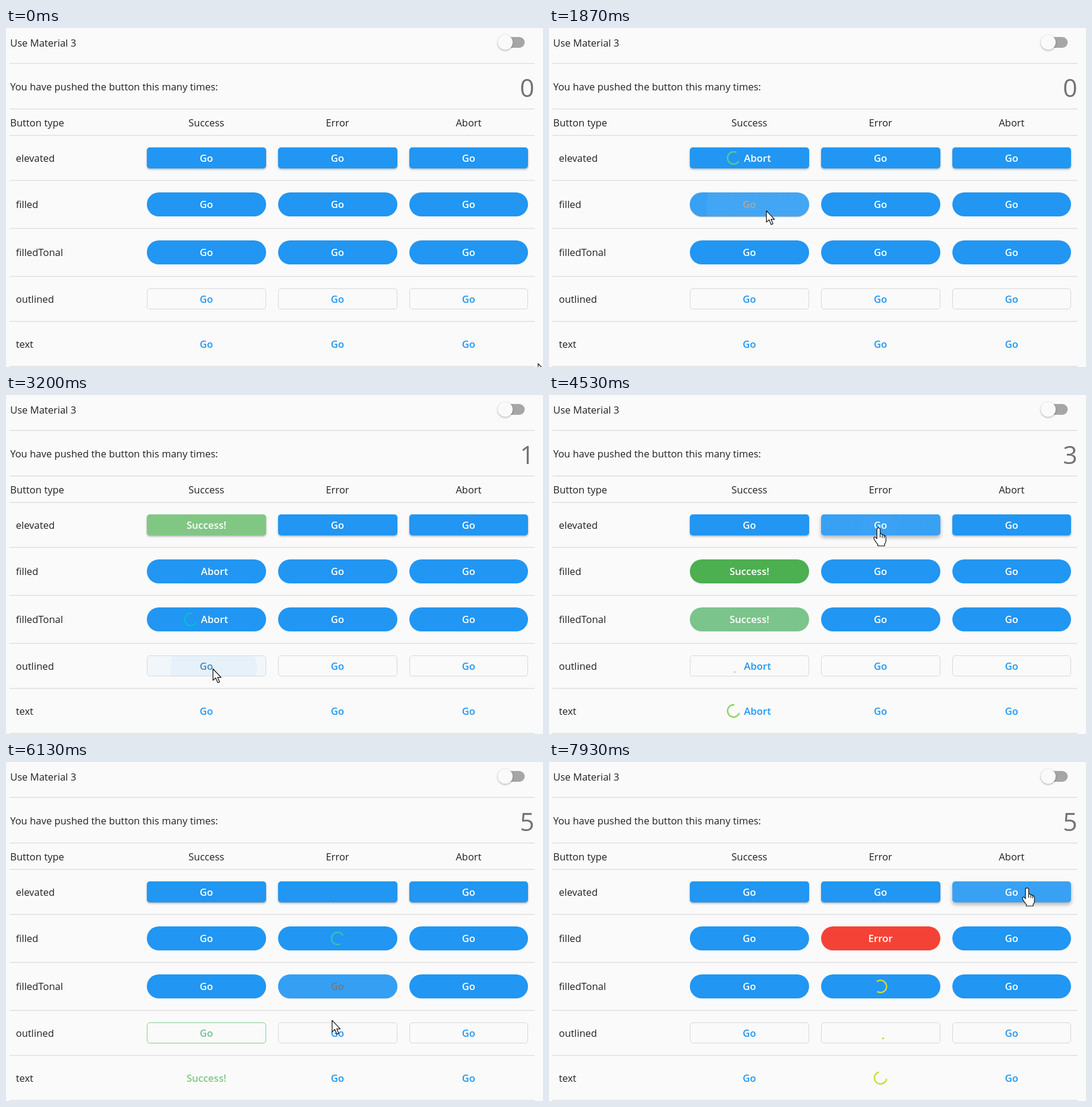
These frames come from a looping animation (896x565 px, 8000 ms). An HTML page:

```html
<!DOCTYPE html>
<html lang="en">
<head>
<meta charset="utf-8">
<title>Progress buttons</title>
<style>
  html, body { margin: 0; width: 100%; height: 100%; overflow: hidden; background: #fafafa; }
  #stage { position: relative; width: 896px; height: 565px; overflow: hidden; }
  svg { position: absolute; left: 0; top: 0; }
  text { font: 16.45px "Open Sans", "Noto Sans", sans-serif; fill: #212121; }
  .mid { text-anchor: middle; }
  .label { font-weight: 600; font-size: 16.6px; text-anchor: middle; }
  .count { font-size: 42px; fill: #737373; text-anchor: middle; }
  .button { position: absolute; box-sizing: border-box; }
  .thumb { filter: drop-shadow(0 1.5px 1.5px rgba(0, 0, 0, .35)); }
</style>
</head>
<body>
<div id="stage">
  <svg id="table" width="896" height="565"></svg>
  <div id="buttons"></div>
  <svg id="overlay" width="896" height="565"></svg>
</div>
<script>
const LOOP = 8000, STEP = 680, LEAD = 250, RESULT = 1040, FADE = 150;
const LEFT = 235, TOP = 199, PITCH = 218.75, WIDTH = PITCH - 20, GAP = 40;
const BLUE = '#2196f3', LIME = '#cddc39', CYAN = '#00bcd4', GREEN = '#81c784', RED = '#e57373';

const rows = [
  { name: 'elevated', solid: true },
  { name: 'filled', solid: true, pill: true, success: '#4caf50', error: '#f44336' },
  { name: 'filledTonal', solid: true, pill: true },
  { name: 'outlined', border: true },
  { name: 'text' },
];
let nextY = TOP;
for (const row of rows) {
  row.h = row.pill ? 40 : 35;
  row.radius = row.pill ? 20 : 5;
  row.y = nextY;
  row.cy = row.y + row.h / 2;
  nextY += row.h + GAP;
}

// Each column is clicked from top to bottom, one button per STEP.
const columns = [
  { name: 'Success', first: 1330, busy: 1700, aim: 20 },
  { name: 'Error', first: 4780, busy: 1800, aim: -3 },
  { name: 'Abort', first: Infinity, busy: 0, aim: 0 },
];
columns.forEach((column, c) => {
  column.x = LEFT + PITCH * c;
  column.cx = column.x + WIDTH / 2;
});

const buttons = columns.flatMap(column => rows.map((row, r) => {
  const start = column.first + STEP * r, done = start + column.busy;
  const succeeds = column.name === 'Success';
  return {
    ...row, x: column.x, cx: column.cx, start, done, succeeds,
    press: start - LEAD, reset: done + RESULT,
    target: [column.cx + column.aim + 9 * Math.sin(r * Math.PI / 2), row.cy + 5],
    resultText: succeeds ? 'Success!' : 'Error',
    resultColor: succeeds ? row.success || GREEN : row.error || RED,
  };
}));

// Pointer stops: time, x, y. It rests on each button around its press.
const stops = [
  [0, 893, 562], [430, 160, 177],
  ...buttons.filter(b => b.press < LOOP).flatMap(b => [[b.press - 120, ...b.target], [b.press + 100, ...b.target]]),
  [7850, 798, 210], [LOOP, 798, 210],
];

const clamp = v => Math.max(0, Math.min(1, v));
const ramp = (t, from, length) => clamp((t - from) / length);
const smooth = v => v * v * (3 - 2 * v);
const mix = (a, b, k) => `color-mix(in srgb, ${b} ${(k * 100).toFixed(1)}%, ${a})`;
const write = (x, y, value, kind = '', color = '') =>
  `<text x="${x}" y="${y}" class="${kind}"${color && ` style="fill:${color}"`}>${value}</text>`;

function pointer(t) {
  const i = Math.max(1, stops.findIndex(stop => stop[0] >= t));
  const [from, to] = [stops[i - 1], stops[i]];
  const k = 1 - (1 - ramp(t, from[0], to[0] - from[0])) ** 3;
  return [1, 2].map(n => from[n] + (to[n] - from[n]) * k);
}

// cubic-bezier(.4, 0, .2, 1)
function fastOutSlowIn(x) {
  let lo = 0, hi = 1;
  for (let i = 0; i < 14; i++) {
    const s = (lo + hi) / 2;
    if (1.2 * s * (1 - s) ** 2 + .6 * s * s * (1 - s) + s ** 3 < x) lo = s; else hi = s;
  }
  return smooth(lo);
}

function spinner(cx, cy, elapsed, color) {
  const phase = elapsed / 1333 % 1;
  const head = fastOutSlowIn(clamp(phase * 2)), tail = fastOutSlowIn(clamp(phase * 2 - 1));
  const from = Math.PI * (-.5 + tail * 1.5 + elapsed / 2222 * 2 + phase * .5);
  const sweep = Math.max((head - tail) * 1.5 * Math.PI, .2);
  const point = angle => `${cx + 10.2 * Math.cos(angle)} ${cy + 10.2 * Math.sin(angle)}`;
  return `<path d="M${point(from)}A10.2 10.2 0 ${+(sweep > Math.PI)} 1 ${point(from + sweep)}"
    fill="none" stroke-width="2.5" style="stroke:${color}"/>`;
}

const inside = (b, [x, y]) => x >= b.x && x <= b.x + WIDTH && y >= b.y && y <= b.y + b.h;
const resultAmount = (b, t) => ramp(t, b.done, FADE) - ramp(t, b.reset, FADE);

function hoverAmount(b, t) {
  let hits = 0;
  for (let lag = 0; lag < 150; lag += 30) hits += inside(b, pointer(Math.max(0, t - lag)));
  return clamp(hits / 3);
}

function buttonBox(b, t, tone) {
  const hover = hoverAmount(b, t);
  const layer = alpha => `rgba(${b.solid ? '255,255,255' : '33,150,243'},${alpha})`;
  const layers = [`linear-gradient(${layer(hover * (b.solid ? .1 : .04))} 0 0)`];
  if (t >= b.press && t < b.start + 150) {
    const radius = 30 + 150 * smooth(ramp(t, b.press, 230));
    const ink = layer(.055 * ramp(t, b.press - 20, 75) * (1 - ramp(t, b.start, 150)));
    const [x, y] = b.target;
    layers.unshift(`radial-gradient(circle at ${x - b.x}px ${y - b.y}px, ${ink} ${radius - 1}px, transparent ${radius}px)`);
  }
  const lift = b.name === 'elevated' ? 2 + 2 * hover : b.solid ? hover : 0;
  return `<div class="button" style="left:${b.x}px;top:${b.y}px;width:${WIDTH}px;height:${b.h}px;
    border-radius:${b.radius}px;background:${layers.join()},${b.solid ? tone : 'transparent'};
    ${b.border ? `border:1px solid ${mix('#d8d8d8', b.resultColor, resultAmount(b, t))};` : ''}
    box-shadow:0 ${lift * .9}px ${lift * 1.6}px rgba(0,0,0,${lift ? .3 : 0})"></div>`;
}

function buttonLabel(b, t, tone, tint) {
  const color = b.solid ? '#fff' : tone, base = b.cy + 6;
  if (t >= b.start && t < b.done) {
    return b.succeeds
      ? spinner(b.cx - 26.3, b.cy, t - b.start, tint) + write(b.cx + 13.5, base, 'Abort', 'label', color)
      : spinner(b.cx, b.cy, t - b.start, tint);
  }
  if (t >= b.done && t < b.reset) return write(b.cx, base, b.resultText, 'label', color);
  const dim = t < b.start ? ramp(t, b.press, 175) : 0;
  return write(b.cx, base, 'Go', 'label', mix(color, '#777', dim));
}

function cursor(t) {
  const at = pointer(t);
  const hand = buttons.some(b => inside(b, at) && (t < b.press + 70 || t >= b.reset));
  const shape = hand
    ? 'M-3 18V2.5a2.7 2.7 0 0 1 5.4 0V10q2.8-.8 3.5 1.5q2.6-.7 3.2 1.5q2.9-.3 2.9 3V22q0 3-2.2 5V30H-1.5V27.5Q-4 25-7.5 19q-1.5-4 1-4q1.7 0 3.5 3zM2.4 10V16M5.9 11.5V16.5M9.1 13V17'
    : 'M0 0V19L4.5 15L8 23L11 21.7L7.7 14.2H13.5Z';
  return `<path transform="translate(${at})" d="${shape}" fill="#fff" stroke="#111" stroke-width="1.2" stroke-linejoin="round"/>`;
}

document.getElementById('table').innerHTML =
  [59, 135, ...rows.map(r => r.y - GAP / 2), nextY - GAP / 2]
    .map(y => `<rect x="6" y="${y - 1}" width="876" height="2" fill="#e6e6e6"/>`).join('') +
  write(7, 31, 'Use Material 3') +
  write(7, 104, 'You have pushed the button this many times:') +
  write(7, 164, 'Button type') +
  columns.map(c => write(c.cx, 164, c.name, 'mid')).join('') +
  rows.map(r => write(16.5, r.cy + 6, r.name)).join('') +
  '<rect x="824" y="15" width="41.5" height="18" rx="9" fill="#a6a6a6"/>' +
  '<circle class="thumb" cx="833" cy="24" r="12.5" fill="#fafafa"/>';

const boxes = document.getElementById('buttons'), overlay = document.getElementById('overlay');

function draw() {
  const t = performance.now() % LOOP;
  const tint = mix(CYAN, LIME, .5 - .5 * Math.cos((t - 3150) / 1050 * 2 * Math.PI));
  const tones = buttons.map(b => mix(BLUE, b.resultColor, resultAmount(b, t)));
  const count = buttons.filter(b => b.succeeds && t >= b.done).length;
  boxes.innerHTML = buttons.map((b, i) => buttonBox(b, t, tones[i])).join('');
  overlay.innerHTML = buttons.map((b, i) => buttonLabel(b, t, tones[i], tint)).join('') +
    write(869.5, 115, count, 'count') + cursor(t);
  requestAnimationFrame(draw);
}
draw();
</script>
</body>
</html>
```
